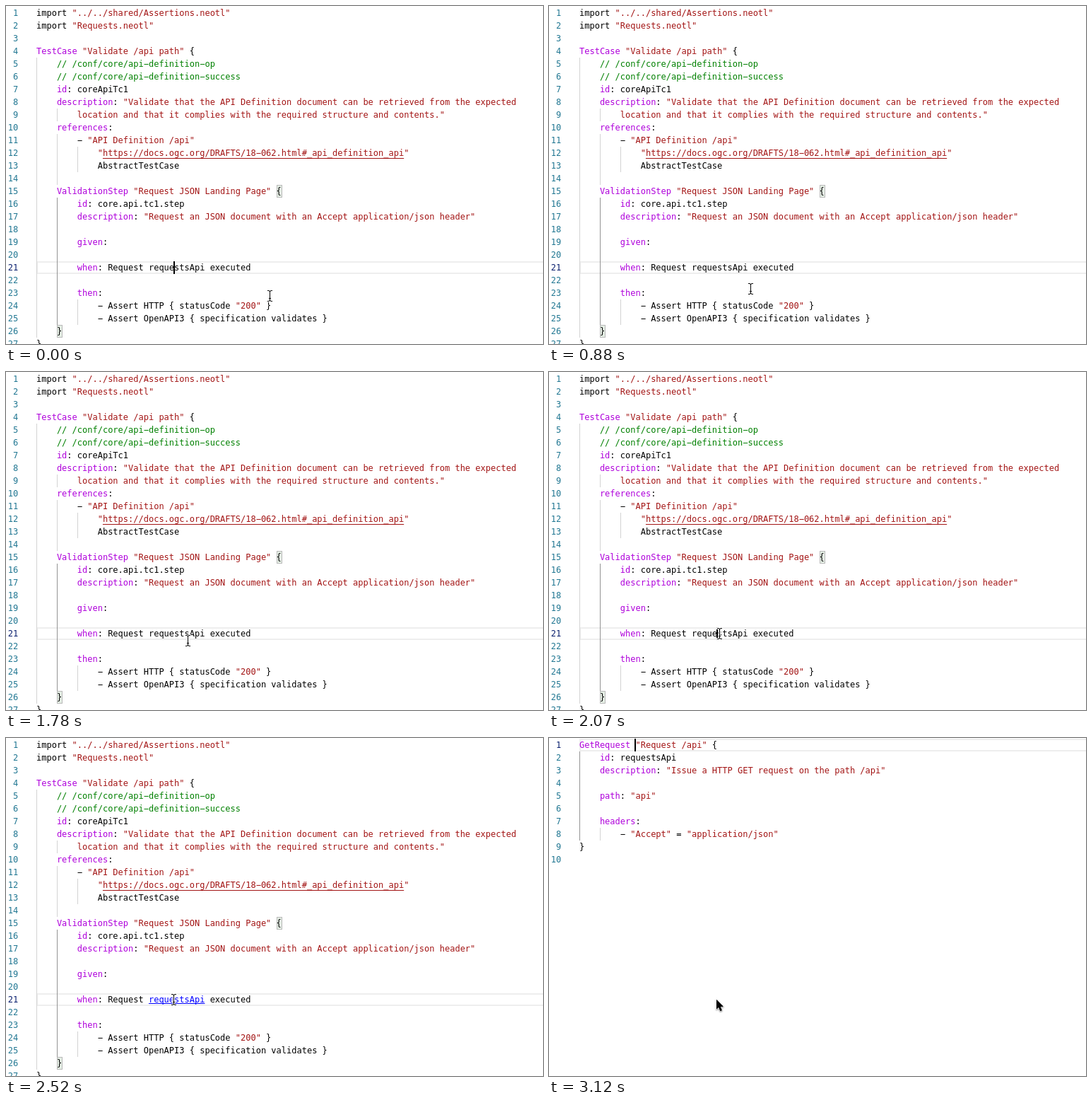
These frames come from a looping animation (760x478 px, 3.26 s). An HTML page with a canvas:

```html
<!DOCTYPE html>
<html lang="en">
<head>
<meta charset="utf-8">
<title>Editor: go to definition</title>
<style>
  html, body { margin: 0; width: 100%; height: 100%; overflow: hidden; background: #fff; }
  canvas { display: block; }
</style>
</head>
<body>
<canvas id="stage" width="760" height="478"></canvas>
<script>
const ctx = document.getElementById('stage').getContext('2d');
const W = 760, H = 478, LOOP = 3260;
const LEFT = 43, TOP = 1, ROW = 18, BASE = 13, NUMBER_RIGHT = 17.3;
const FONT = '12px "DejaVu Sans Mono", Menlo, monospace';
const COLOR = {
  text: '#000', keyword: '#af00db', string: '#a31515', comment: '#008000',
  number: '#237893', activeNumber: '#0b216f', link: '#0000ff',
  guide: '#d3d3d3', activeGuide: '#939393', line: '#eeeeee', match: '#f5bfa8'
};

const testFile = `import "../../shared/Assertions.neotl"
import "Requests.neotl"

TestCase "Validate /api path" {
    // /conf/core/api-definition-op
    // /conf/core/api-definition-success
    id: coreApiTc1
    description: "Validate that the API Definition document can be retrieved from the expected
        location and that it complies with the required structure and contents."
    references:
        - "API Definition /api"
            "https://docs.ogc.org/DRAFTS/18-062.html#_api_definition_api"
            AbstractTestCase

    ValidationStep "Request JSON Landing Page" {
        id: core.api.tc1.step
        description: "Request an JSON document with an Accept application/json header"

        given:

        when: Request requestsApi executed

        then:
            - Assert HTTP { statusCode "200" }
            - Assert OpenAPI3 { specification validates }
    }
}`.split('\n');

const requestFile = `GetRequest "Request /api" {
    id: requestsApi
    description: "Issue a HTTP GET request on the path /api"

    path: "api"

    headers:
        - "Accept" = "application/json"
}
`.split('\n');

ctx.font = FONT;
const CHAR = ctx.measureText('0').width;
const colX = col => LEFT + col * CHAR;
const rowY = row => TOP + (row - 1) * ROW;

function rect(color, x, y, w, h) {
  ctx.fillStyle = color;
  ctx.fillRect(x, y, w, h);
}

function write(text, color, x, row) {
  ctx.fillStyle = color;
  // the wide minus glyph stands for the editor font's long hyphen
  ctx.fillText(text.replace(/-/g, '\u2212'), x, rowY(row) + BASE);
}

// Splits a line into coloured pieces; a string may run on to the next line.
function tokenize(lines) {
  const pattern = /\/\/.*|"[^"]*"?|\b(?:TestCase|ValidationStep|GetRequest)\b|\w+(?=:)|[^\s"]+/g;
  let open = false;
  return lines.map(line => {
    const tokens = [];
    const add = (text, col, color) => tokens.push({ text, col, color });
    if (open) {
      const text = line.trim();
      add(text, line.indexOf(text), COLOR.string);
      open = false;
      return tokens;
    }
    for (const { 0: text, index } of line.matchAll(pattern)) {
      let color = COLOR.text;
      if (text.startsWith('//')) color = COLOR.comment;
      else if (text[0] === '"') {
        color = COLOR.string;
        open = !text.endsWith('"');
      } else if (/^(TestCase|ValidationStep|GetRequest)$/.test(text) || line[index + text.length] === ':') {
        color = COLOR.keyword;
      }
      add(text, index, color);
    }
    return tokens;
  });
}

function guideDepth(lines, i) {
  if (lines[i]) return Math.floor(lines[i].search(/\S/) / 4);
  const above = lines[i - 1], below = lines[i + 1];
  if (!above || !below) return 0;
  const a = above.search(/\S/) / 4, b = below.search(/\S/) / 4;
  return a > b ? b + 1 : b;
}

function makeDoc(lines, currentRow, activeGuide) {
  return {
    tokens: tokenize(lines),
    guides: lines.map((_, i) => guideDepth(lines, i)),
    currentRow, activeGuide
  };
}

const testDoc = makeDoc(testFile, 21, { depth: 1, from: 16, to: 25 });
const requestDoc = makeDoc(requestFile, 1, { depth: 0, from: 2, to: 8 });

function drawLineFrame(row) {
  const y = rowY(row);
  rect(COLOR.line, LEFT, y, W - LEFT, 2);
  rect(COLOR.line, LEFT, y + ROW - 2, W - LEFT, 2);
  rect(COLOR.line, LEFT, y, 2, ROW);
}

function drawGuides({ guides, activeGuide: active }) {
  guides.forEach((count, i) => {
    for (let d = 0; d < count; d++) {
      const on = d === active.depth && i + 1 >= active.from && i + 1 <= active.to;
      rect(on ? COLOR.activeGuide : COLOR.guide, Math.round(colX(d * 4)), rowY(i + 1), 1, ROW);
    }
  });
}

function drawText({ tokens, currentRow }, linked) {
  tokens.forEach((line, i) => {
    const row = i + 1, label = String(row);
    write(label, row === currentRow ? COLOR.activeNumber : COLOR.number,
      NUMBER_RIGHT - label.length * CHAR, row);
    for (const { text, col, color } of line) {
      const isLink = linked && row === currentRow && text === 'requestsApi';
      write(text, isLink ? COLOR.link : color, colX(col), row);
    }
  });
}

function drawBracket(col, row) {
  const x = Math.round(colX(col)), y = rowY(row);
  rect('rgba(0,100,0,.1)', x, y, 8, ROW);
  ctx.strokeStyle = '#b9b9b9';
  ctx.lineWidth = 1;
  ctx.strokeRect(x + .5, y + .5, 7, ROW - 1);
}

function drawCaret(col, row) {
  rect('#000', Math.floor(colX(col) - 1), rowY(row), 2, ROW);
}

function outlined(path, fill, edge, width) {
  ctx.lineJoin = 'round';
  ctx.lineWidth = width;
  ctx.strokeStyle = edge;
  ctx.stroke(path);
  ctx.fillStyle = fill;
  ctx.fill(path);
}

const beamPath = new Path2D('M0 0h2l1.5 1L5 0h2v1H5L4 2v9h1v1H4v2l1 1h2v1H5l-1.5-1L2 16H0v-1h2l1-1v-2H2v-1h1V2L2 1H0z');
const arrowPath = new Path2D('M0 0v13.6l3.1-3 2.3 5.3 2.3-1-2.3-5.2h4.3z');
const handPath = new Path2D('M-1.3 9V1.2a1.3 1.3 0 0 1 2.6 0V6q2-1 2.6.5 2-.6 2.5.8 2-.3 2 1.8v3q0 2-1.4 4H-1.5q-1-2.5-4-5.5-1-1.8.6-2.2 1.4 0 3.6 2z');

const pointers = {
  beam() { outlined(beamPath, '#000', '#fff', 2); },
  arrow() {
    ctx.shadowColor = 'rgba(0,0,0,.35)';
    ctx.shadowBlur = 2;
    ctx.shadowOffsetY = 1;
    outlined(arrowPath, '#000', '#fff', 1.8);
    ctx.shadowColor = 'transparent';
    ctx.fill(arrowPath);
  },
  hand() { outlined(handPath, '#fff', '#000', 2); }
};

// Pointer stops: start time, x, y, shape.
const stops = [
  [0, 370, 402], [150, 321, 398], [290, 296, 396], [440, 294, 396], [590, 292, 395],
  [730, 289, 394], [880, 282, 392], [1030, 274, 389], [1180, 269, 386], [1330, 266, 383],
  [1480, 262, 379], [1630, 261, 378], [1780, 254, 372], [1930, 243, 364], [2070, 238, 362],
  [2220, 240, 370, 'hand'], [2370, 234, 362], [2820, 237, 370, 'arrow']
];

function drawPointer(t) {
  const [, x, y, shape = 'beam'] = stops.findLast(stop => stop[0] <= t);
  ctx.save();
  ctx.translate(x, y);
  pointers[shape]();
  ctx.restore();
}

const between = (t, from, to) => t >= from && t < to;

function drawTestCase(t) {
  const linked = t >= 2220;
  drawLineFrame(21);
  drawGuides(testDoc);
  drawBracket(47, 15);
  drawBracket(4, 26);
  drawText(testDoc, linked);
  rect(COLOR.string, colX(13), rowY(12) + 16, 59 * CHAR, 1);
  if (linked) {
    const x = colX(22), y = rowY(21) + 14;
    rect(COLOR.link, x, y, 11 * CHAR, 1);
  }
  const caretOff = between(t, 590, 1030) || between(t, 1480, 2070) || t >= 2520;
  if (!caretOff) drawCaret(27, 21);
}

function drawRequest(t) {
  drawLineFrame(1);
  if (t < 3120) rect(COLOR.match, 122, rowY(1), 102, ROW);
  drawGuides(requestDoc);
  drawText(requestDoc, false);
  drawCaret(11, 1);
}

function render(now) {
  const t = now % LOOP;
  rect('#fff', 0, 0, W, H);
  ctx.font = FONT;
  (t < 2820 ? drawTestCase : drawRequest)(t);
  drawPointer(t);
}

let start;
function tick(now) {
  start ??= now;
  render(now - start);
  requestAnimationFrame(tick);
}
render(0);
requestAnimationFrame(tick);
</script>
</body>
</html>
```
